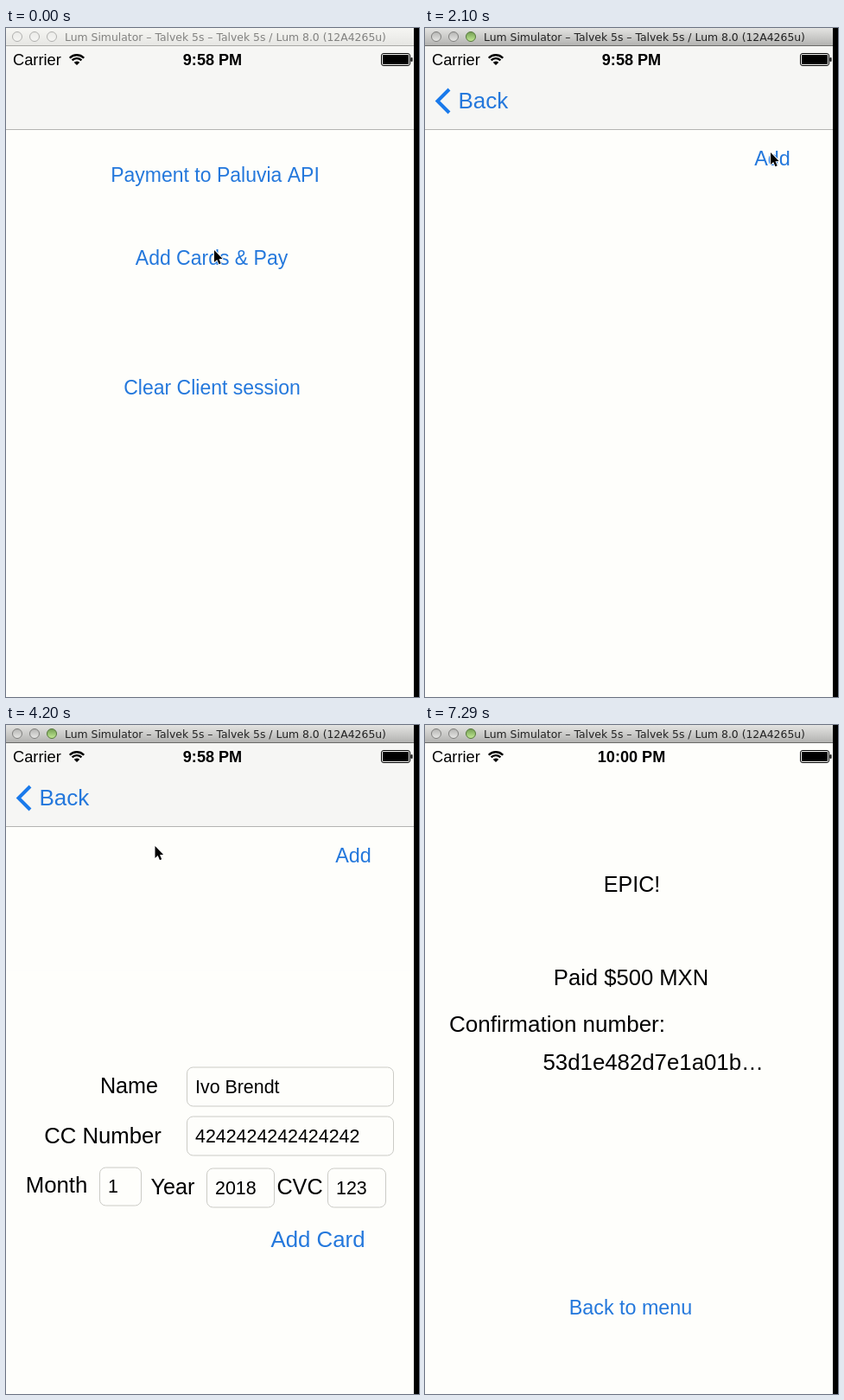
These frames come from a looping animation (478 px wide and 774 px high, 7.35 s). An HTML page with a canvas:

```html
<!DOCTYPE html>
<html lang="en">
<head>
<meta charset="utf-8">
<title>Card payment demo</title>
<style>
html, body { margin: 0; width: 100%; height: 100%; overflow: hidden; background: #000; }
canvas { display: block; width: 100vw; height: 100vh; }
</style>
</head>
<body>
<canvas id="stage" width="478" height="774"></canvas>
<script>
const ctx = document.getElementById('stage').getContext('2d');
const LOOP = 7350, STEP = 30, W = 472, H = 774, TOP = 21;
const PAGE = '#fefefb', BAR = '#f6f6f4', INK = '#000', BLUE = '#2478dc';
const SANS = '"Liberation Sans", Arial, sans-serif';
const TITLE = 'Lum Simulator – Talvek 5s – Talvek 5s / Lum 8.0 (12A4265u)';

// Pointer path: time, x, y
const POINTER = [
  [0, 241, 257], [330, 241, 257], [540, 400, 142], [690, 400, 142],
  [960, 374, 311], [1050, 364, 328], [1140, 364, 328], [1320, 400, 144],
  [2430, 400, 144], [2850, 388, 116], [3030, 388, 116], [3420, 366, 328],
  [3750, 366, 328], [3930, 168, 141], [3990, 172.5, 140], [4350, 172.5, 140],
  [4590, 262, 462], [4860, 266, 465], [4950, 266, 465], [5130, 378, 531],
  [5250, 378, 531], [5490, 363, 352], [7050, 363, 352], [7260, 198, 6],
  [7290, 198, -30]
];

const clamp = v => Math.max(0, Math.min(1, v));
const span = (t, from, length) => clamp((t - from) / length);
const easeOut = p => 1 - (1 - p) ** 3;
const smooth = p => p * p * (3 - 2 * p);
const mix = (a, b, p) => a + (b - a) * p;

function text(str, x, y, size, { color = INK, align = 'left', weight = '', font = SANS, alpha = 1 } = {}) {
  ctx.font = `${weight} ${size}px ${font}`;
  ctx.fillStyle = color;
  ctx.textAlign = align;
  ctx.globalAlpha = alpha;
  ctx.fillText(str, x, y);
  ctx.globalAlpha = 1;
}

const centered = (str, x, y, size) => text(str, x, y, size, { align: 'center' });
const link = (str, x, y, size, alpha = 1) =>
  text(str, x, y, size, { color: BLUE, align: 'center', alpha });

function box(x, y, w, h, color) {
  ctx.fillStyle = color;
  ctx.fillRect(x, y, w, h);
}

function roundRect(x, y, w, h, r) {
  ctx.beginPath();
  ctx.roundRect(x, y, w, h, r);
}

function shifted(dx, dy, draw) {
  ctx.save();
  ctx.translate(dx, dy);
  draw();
  ctx.restore();
}

// Tapped links dim, then fade back
function tapped(t, at, hold = 90) {
  if (t < at) return 1;
  return mix(0.25, 1, span(t, at + hold, 150));
}

function menu(t) {
  box(0, TOP, W, H, PAGE);
  link('Payment to Paluvia API', 242, 178, 23);
  link('Add Cards & Pay', 238, 274, 23, t < 600 ? tapped(t, 30) : 1);
  link('Clear Client session', 238.5, 424, 23);
}

function list(t) {
  box(0, TOP, W, H, PAGE);
  const alpha = t < 1500 ? tapped(t, 510) : tapped(t, 2130);
  link('Add', 402, 158.5, 23.4, alpha);
}

function navBar(backAlpha) {
  box(0, TOP, W, 96, BAR);
  box(0, 117, W, 1, '#b4b4b2');
  if (backAlpha <= 0) return;
  ctx.globalAlpha = backAlpha;
  ctx.strokeStyle = '#1a7aeb';
  ctx.lineWidth = 4;
  ctx.beginPath();
  ctx.moveTo(28, 71);
  ctx.lineTo(14.5, 84.5);
  ctx.lineTo(28, 98);
  ctx.stroke();
  text('Back', 38.5, 93, 26, { color: BLUE, alpha: backAlpha });
}

function field(x, y, w, h, value, baseline) {
  roundRect(x + 0.5, y + 0.5, w, h, 7);
  ctx.fillStyle = PAGE;
  ctx.fill();
  ctx.strokeStyle = '#cbcbc6';
  ctx.lineWidth = 1;
  ctx.stroke();
  text(value, x + 10, baseline, 21.4);
}

function form(t) {
  box(0, TOP, W, H, PAGE);
  centered('Name', 142.5, 163, 25.2);
  centered('CC Number', 112, 221, 25.7);
  centered('Month', 58.5, 278.5, 25.8);
  centered('Year', 193, 280, 25.2);
  centered('CVC', 340, 280, 25.2);
  field(209, 133, 239, 45, 'Ivo Brendt', 163);
  field(209, 190, 239, 45, '4242424242424242', 220);
  field(108, 249, 48, 44, '1', 278.5);
  field(232, 250, 78, 45, '2018', 280);
  field(372, 250, 67, 45, '123', 280);
  link('Add Card', 361, 341, 25.8, t < 2000 ? tapped(t, 1080) : tapped(t, 3600, 120));
}

function payment(t) {
  box(0, TOP, W, H, PAGE);
  text('Payment:', 28, 143, 25.4);
  text('50 MXN', 463, 143, 25.4, { align: 'right' });
  text('Reference ID', 28, 187, 25.2);
  text('JOdHyrh4Ma2J2eMwRAEO', 213, 185, 18.5);
  text('Card', 28, 230, 25.2);
  text('**** **** ****', 260, 231, 23.6);
  text('4242', 447, 230, 25.2, { align: 'right' });
  link('Cancel', 121, 534, 25.3);
  link('Pay', 379.5, 532, 22.8, tapped(t, 5160));
}

function receipt() {
  box(0, TOP, W, H, PAGE);
  centered('EPIC!', 239.5, 193, 25);
  centered('Paid $500 MXN', 238.5, 301, 25.6);
  text('Confirmation number:', 28, 355, 26);
  text('53d1e482d7e1a01b…', 136.5, 399, 25.8);
  link('Back to menu', 238, 682, 23.3);
}

function statusBar(t) {
  text('Carrier', 8, 43, 18.3);
  text(t < 5310 ? '9:58 PM' : '10:00 PM', 239, 43, 18.1, { align: 'center', weight: 'bold' });

  ctx.strokeStyle = ctx.fillStyle = INK;
  ctx.lineWidth = 2.4;
  for (const r of [7.4, 11.3]) {
    ctx.beginPath();
    ctx.arc(82, 42.5, r, -Math.PI * 0.76, -Math.PI * 0.24);
    ctx.stroke();
  }
  ctx.beginPath();
  ctx.moveTo(82, 43);
  ctx.arc(82, 43, 4.6, -Math.PI * 0.76, -Math.PI * 0.24);
  ctx.fill();

  ctx.lineWidth = 1;
  roundRect(434.5, 29.5, 33, 14, 2.5);
  ctx.stroke();
  roundRect(436, 31, 30, 11, 1);
  ctx.fill();
  roundRect(468.5, 34, 2, 5, 1);
  ctx.fill();
}

function titleBar(active) {
  const shade = ctx.createLinearGradient(0, 0, 0, 20);
  shade.addColorStop(0, active ? '#e4e4e2' : '#f6f6f3');
  shade.addColorStop(1, active ? '#b3b3b1' : '#e6e6e3');
  box(0, 0, W, 20, shade);
  box(0, 20, W, 1, active ? '#6a6a68' : '#a9a9a6');

  [13, 33, 53].forEach((x, i) => {
    ctx.beginPath();
    ctx.arc(x, 10, 5.5, 0, Math.PI * 2);
    const fill = ctx.createLinearGradient(0, 4, 0, 16);
    const green = active && i === 2;
    fill.addColorStop(0, green ? '#6f9a4e' : active ? '#b2b2b0' : '#ebebe8');
    fill.addColorStop(1, green ? '#c9f09a' : active ? '#ebebe9' : '#f6f6f4');
    ctx.fillStyle = fill;
    ctx.fill();
    ctx.strokeStyle = green ? '#55773c' : active ? '#7e7e7c' : '#b0b0ae';
    ctx.lineWidth = 1;
    ctx.stroke();
  });
  text(TITLE, 68, 15, 12.4, {
    color: active ? '#222' : '#828280',
    font: '"DejaVu Sans", "Open Sans", sans-serif'
  });
}

function pointer(t) {
  const i = POINTER.findIndex(key => key[0] > t);
  const b = POINTER[i < 0 ? POINTER.length - 1 : i];
  const a = i < 0 ? b : POINTER[i - 1];
  const p = smooth(span(t, a[0], b[0] - a[0] || 1));
  shifted(mix(a[1], b[1], p), mix(a[2], b[2], p), () => {
    ctx.beginPath();
    ctx.moveTo(0, 0);
    ctx.lineTo(0, 14);
    ctx.lineTo(3.2, 11);
    ctx.lineTo(5.5, 16.2);
    ctx.lineTo(7.7, 15.2);
    ctx.lineTo(5.5, 10.2);
    ctx.lineTo(9.6, 9.9);
    ctx.closePath();
    ctx.lineWidth = 1.8;
    ctx.lineJoin = 'round';
    ctx.strokeStyle = '#fff';
    ctx.stroke();
    ctx.fillStyle = '#000';
    ctx.fill();
    ctx.lineJoin = 'miter';
  });
}

const FULL = H - TOP;
const slideUp = (t, at, length = 270) => FULL * (1 - easeOut(span(t, at, length)));
const slideDown = (t, at) => t < at ? 0 : mix(262.5, FULL, easeOut(span(t, at, 240)));

function formOffset(t) {
  if (t < 1590) return slideUp(t, 540);
  if (t < 2190) return slideDown(t, 1590);
  if (t < 4200) return slideUp(t, 2190);
  return slideDown(t, 4200);
}

function modal(offset, draw, t) {
  if (offset < FULL) shifted(0, offset, () => draw(t));
}

function render(t) {
  box(0, 0, 478, H, '#000');
  ctx.save();
  ctx.beginPath();
  ctx.rect(0, 0, W, H);
  ctx.clip();

  const push = easeOut(span(t, 90, 270));
  if (push < 1) shifted(-W * 0.3 * push, 0, () => menu(t));
  if (push > 0) shifted(W * (1 - push), 0, () => list(t));
  navBar(push);

  modal(formOffset(t), form, t);
  modal(slideUp(t, 4620, 240), payment, t);
  modal(slideUp(t, 6480, 240), receipt, t);

  statusBar(t);
  titleBar(t >= 30);
  pointer(t);
  ctx.restore();
}

const start = performance.now();
function tick() {
  const t = (performance.now() - start) % LOOP;
  render(Math.floor(t / STEP) * STEP);
  requestAnimationFrame(tick);
}
tick();
</script>
</body>
</html>
```
